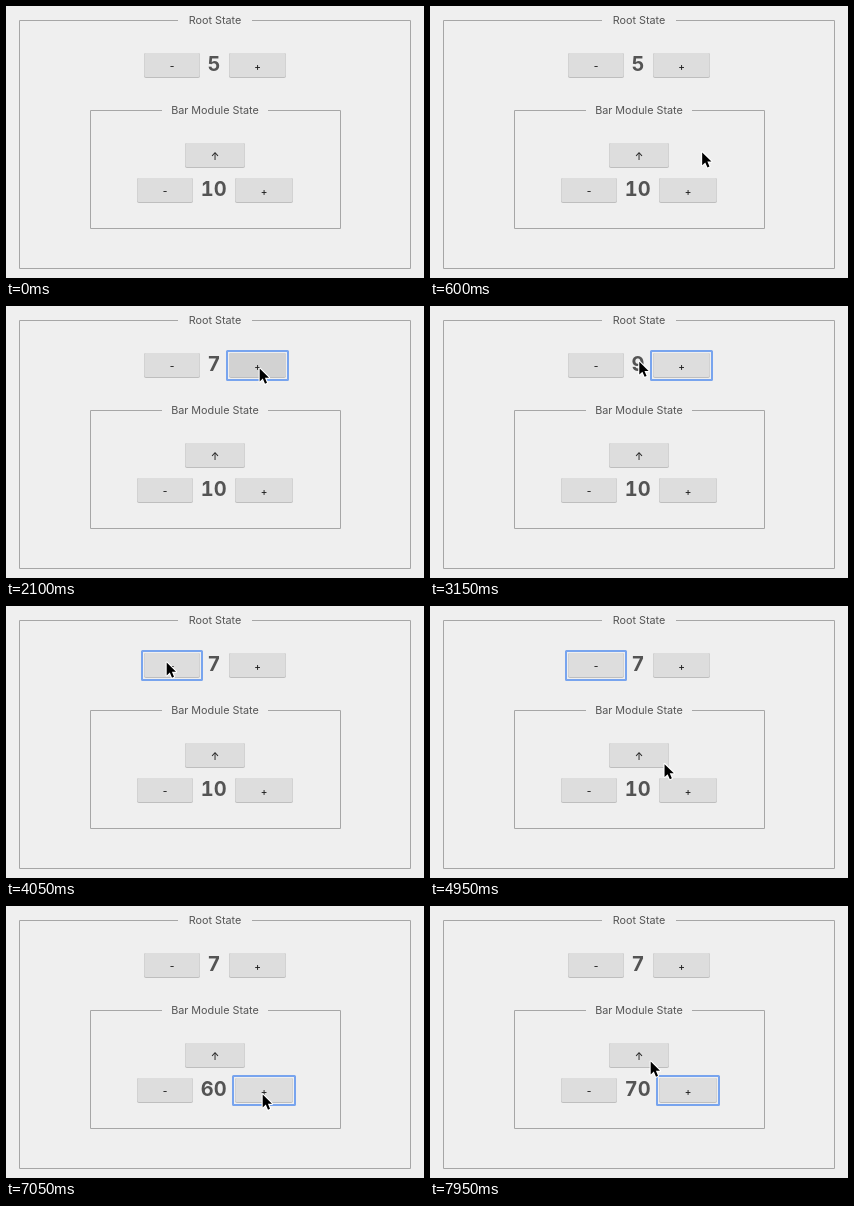
Animation, 418 px wide and 272 px high, one loop 8 s. Source, as an HTML page:

```html
<!DOCTYPE html>
<html lang="en">
<head>
<meta charset="utf-8">
<title>Module state counters</title>
<style>
  html, body { margin: 0; width: 100%; height: 100%; overflow: hidden; background: #efefef; }
  svg { display: block; width: 418px; height: 272px; font-family: Inter, sans-serif; }
  text { text-anchor: middle; }
  .frame { fill: none; stroke: #a6a6a6; }
  .label { font-size: 10.8px; fill: #555; }
  .count { font-size: 20px; font-weight: 700; font-variant-numeric: tabular-nums; fill: #545454; }
  .key { font-size: 10px; font-weight: 500; fill: #222; }
</style>
</head>
<body>
<svg viewBox="0 0 418 272">
  <path class="frame" d="M172 14.5H13.5V262.5H404.5V14.5H246"/>
  <path class="frame" d="M156 104.5H84.5V222.5H334.5V104.5H262"/>
  <text class="label" x="209" y="18">Root State</text>
  <text class="label" x="209" y="108">Bar Module State</text>
  <g id="buttons"></g>
  <text class="count" id="root" x="208" y="64.8"></text>
  <text class="count" id="bar" x="207.8" y="189.8"></text>
  <rect id="ring" fill="none" stroke="#78a4ee" stroke-width="2" rx=".5"/>
  <path id="cursor" d="M1.7 1.6V14.4L4.8 11.6L7 16.7L9 15.8L6.9 10.8H11Z"
    stroke="#fff" stroke-width="2.2" stroke-linejoin="round" paint-order="stroke"/>
</svg>
<script>
const LOOP = 8000, TICK = 150, HEIGHT = 25;
const $ = id => document.getElementById(id);

// left, top, width, sign, and the times of its clicks
const button = (x, y, width, sign, clicks = []) => ({ x, y, width, sign, clicks });
const rootMinus = button(138, 47, 56, '-', [3750, 4050]);
const rootPlus = button(223, 47, 57, '+', [1350, 1800, 2250, 2850]);
const up = button(179, 137, 60, '↑');
const barMinus = button(131, 172, 56, '-');
const barPlus = button(229, 172, 58, '+', [5550, 5850, 6150, 6450, 7050, 7500]);
const buttons = [rootMinus, rootPlus, up, barMinus, barPlus];

// clicks whose press is held for a tick before release
const held = [2250, 6150];

// pointer strokes: each starts where the last one ended
const entry = { x: 308, y: 315 };
const strokes = [
  { start: 300, steps: 6, x: 252, y: 61, bend: 0 },
  { start: 3150, steps: 3, x: 159, y: 55, bend: 4 },
  { start: 4650, steps: 5, x: 255, y: 187, bend: 0 },
  { start: 7800, steps: 2, x: 219, y: 154, bend: 0 }
];

const easeOut = u => 1 - (1 - u) ** 1.6;
const lerp = (a, b, p) => a + (b - a) * p;
const done = (b, t) => b.clicks.filter(c => c <= t).length;
const lastClick = (b, t) => Math.max(0, ...b.clicks.filter(c => c <= t));

function pointer(t) {
  const i = strokes.filter(s => s.start <= t).length - 1;
  if (i < 0) return null;
  const from = strokes[i - 1] || entry, to = strokes[i];
  const step = Math.floor((t - to.start) / TICK) + 1;
  const p = easeOut(Math.min(1, step / to.steps));
  return [lerp(from.x, to.x, p), lerp(from.y, to.y, p) - to.bend * Math.sin(Math.PI * p)];
}

function setAttrs(el, attrs) {
  for (const k in attrs) el.setAttribute(k, attrs[k]);
}

function add(tag, attrs, text = '') {
  const el = document.createElementNS('http://www.w3.org/2000/svg', tag);
  setAttrs(el, attrs);
  el.textContent = text;
  $('buttons').append(el);
  return el;
}

for (const b of buttons) {
  const { x, y, width } = b;
  add('rect', { x, y, width, height: HEIGHT, rx: 2, fill: '#bebebe' });
  add('rect', { x, y, width, height: HEIGHT - 1, rx: 2, fill: '#d2d2d2' });
  b.face = add('rect', { x: x + 1, y, width: width - 2, height: HEIGHT - 1, rx: 1 });
  add('text', { class: 'key', x: x + width / 2, y: y + 17 }, b.sign);
}

function render(t) {
  $('root').textContent = 5 + done(rootPlus, t) - done(rootMinus, t);
  $('bar').textContent = 10 * (1 + done(barPlus, t) - done(barMinus, t));

  const press = held.find(c => t >= c - TICK && t < c);
  for (const b of buttons) {
    b.face.setAttribute('fill', b.clicks.includes(press) ? '#d2d2d2' : '#dddddd');
  }

  const focus = buttons.reduce((a, b) => lastClick(b, t) > lastClick(a, t) ? b : a);
  const focused = lastClick(focus, t) > 0;
  $('ring').style.display = focused ? '' : 'none';
  if (focused) {
    setAttrs($('ring'), { x: focus.x - 2, y: focus.y - 2, width: focus.width + 4, height: HEIGHT + 4 });
  }

  const pos = pointer(t);
  $('cursor').style.display = pos ? '' : 'none';
  if (pos) $('cursor').setAttribute('transform', `translate(${pos})`);
}

const start = performance.now();
function loop() {
  render((performance.now() - start) % LOOP);
  requestAnimationFrame(loop);
}
loop();
</script>
</body>
</html>
```
